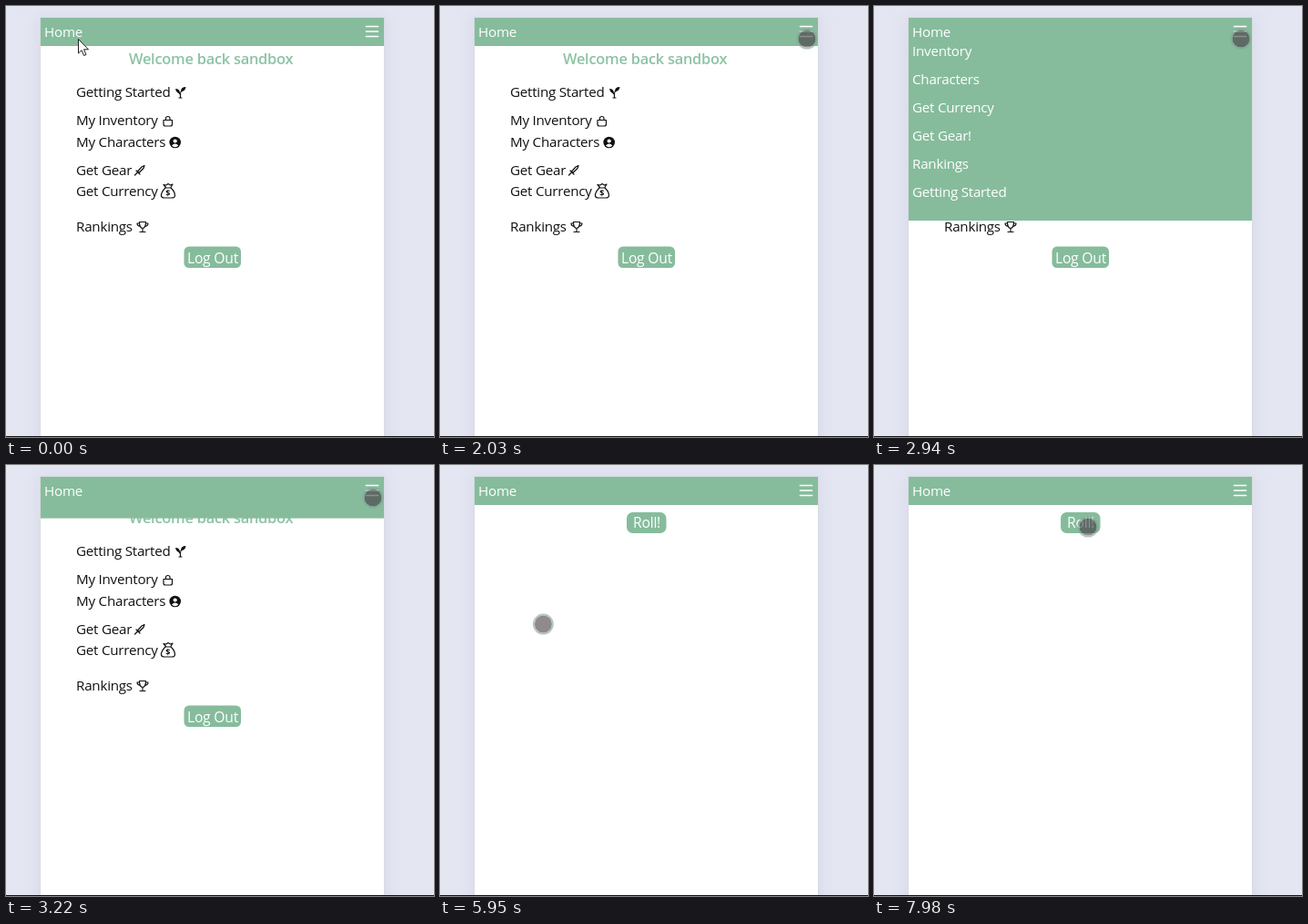
Recreate the animation shown at these times as an HTML page. Size 470 by 474 pixels, loop 8 s.

```html
<!DOCTYPE html>
<html lang="en">
<head>
<meta charset="utf-8">
<title>Game menu</title>
<style>
html, body { margin: 0; width: 100%; height: 100%; overflow: hidden; background: #e4e6f2; }
svg { display: block; width: 470px; height: 474px; font: 15.2px "Open Sans", "Noto Sans", sans-serif; letter-spacing: -.25px; }
.green { fill: #86bc9c; }
.white { fill: #fff; }
.ink { fill: #111; }
.welcome { font-size: 16.4px; font-weight: 600; fill: #8cc3a4; }
.button { font-size: 15.7px; }
.line { fill: none; stroke: #111; stroke-width: 1.2; stroke-linejoin: round; stroke-linecap: round; }
</style>
</head>
<body>
<svg viewBox="0 0 470 474">
  <defs>
    <filter id="blur" x="-20%" y="-20%" width="140%" height="140%"><feGaussianBlur stdDeviation="8"/></filter>
    <clipPath id="card"><rect x="38" y="13" width="377" height="461"/></clipPath>
  </defs>
  <rect width="470" height="474" fill="#e4e6f2"/>
  <rect x="34" y="11" width="385" height="500" fill="#d8daea" filter="url(#blur)"/>
  <rect x="37.5" y="12.5" width="378" height="470" fill="#fff" stroke="#d9dbe2"/>

  <g clip-path="url(#card)">
    <g id="home">
      <text class="welcome" x="135" y="64">Welcome back sandbox</text>
      <g class="ink">
        <text x="77" y="100">Getting Started</text>
        <text x="77" y="131">My Inventory</text>
        <text x="77" y="155">My Characters</text>
        <text x="77" y="186">Get Gear</text>
        <text x="77" y="209">Get Currency</text>
        <text x="77" y="248">Rankings</text>
      </g>
      <!-- seedling -->
      <path class="line" d="M191.500 101V97Q191.500 94 194 92M190 101H193M191 97L188 93"/>
      <path class="ink" d="M186 91Q191 91 191 96Q187 96 186 91ZM192 94Q192 89 197.500 89Q197 94 192 94Z"/>
      <!-- bag -->
      <path class="line" d="M173 125.500H182.500V130Q182.500 132 180.500 132H175Q173 132 173 130ZM175.500 125V123.500Q175.500 121.500 177.750 121.500T180 123.500V125"/>
      <!-- person -->
      <circle class="ink" cx="185.700" cy="150" r="6.300"/>
      <path class="white" d="M182 153.500Q185.700 149.500 189.400 153.500Q185.700 157 182 153.500Z"/>
      <circle class="white" cx="185.700" cy="148.500" r="2.100"/>
      <!-- sword -->
      <path class="line" d="M144.500 182L149 177L152 175.500L151 178.500L146 183.500ZM143 181L147 185M144.500 183L141.500 186"/>
      <!-- money bag -->
      <path class="line" d="M175 200Q170 205 170.500 209Q171 211 174 211H182Q185.500 211 185.500 208.500Q185.500 204 181 200ZM175.500 199.500L173 196.500L176 197L178 195.500L180.500 197L183 196L181 199.500"/>
      <text class="ink" x="175.300" y="209" font-size="9" font-weight="700">$</text>
      <!-- trophy -->
      <path class="line" d="M146.500 237.500H153.500Q153.500 244 150 244.500Q146.500 244 146.500 237.500ZM146.500 239H144Q144 242 147.500 242.500M153.500 239H156Q156 242 152.500 242.500M150 244.500V247.500M147 248.500H153"/>
      <rect class="green" x="195.500" y="264.500" width="62.500" height="23.500" rx="5.500"/>
      <text class="white button" x="199" y="282.500">Log Out</text>
    </g>

    <g id="roll">
      <rect class="green" x="205" y="52" width="43.500" height="23" rx="6.500"/>
      <text class="white button" x="212" y="69">Roll!</text>
    </g>

    <g id="menu" class="white">
      <rect class="green" x="38" y="44" width="377" height="223"/>
    </g>
    <rect class="green" x="38" y="13" width="377" height="31"/>
    <text class="white" x="42" y="34">Home</text>
    <path d="M395.500 22.500H408.500M395.500 28H408.500M395.500 33.500H408.500" stroke="#fff" stroke-width="1.700" stroke-linecap="round"/>
  </g>

  <rect y="473" width="470" height="1" fill="#111"/>

  <g id="pointer">
    <path id="arrow" d="M.5 .5V16L4 12.700L6.500 18.500L9 17.500L6.500 11.800H11.500Z" fill="#fff" stroke="#222" stroke-linejoin="round"/>
    <g id="touch">
      <circle r="9.500" fill="#3c303a" fill-opacity=".57"/>
      <circle r="10.500" fill="none" stroke="#84a098" stroke-opacity=".6" stroke-width="2"/>
    </g>
  </g>
</svg>
<script>
const LOOP = 8000, STEP = 70;
const CARD_RIGHT = 415, MENU_HEIGHT = 223, MENU_TIME = 500;
const MENU_OPENS = 2212, MENU_CLOSES = 2877, PAGE_CHANGES = 5460;

const home = { x: 79, y: 36 };
const moves = [
  { start: 770, end: 1350, x: 449, y: 45 },
  { start: 1350, end: 1900, x: 403, y: 36 },
  { start: 3500, end: 4300, x: 102, y: 181 },
  { start: 5850, end: 6405, x: 235, y: 68, bow: 12 }
];

const $ = id => document.getElementById(id);
const progress = (time, start, end) => Math.min(1, Math.max(0, (time - start) / (end - start)));
const smooth = u => u * u * (3 - 2 * u);
const mix = (a, b, u) => a + (b - a) * u;
const place = (id, x, y) => $(id).setAttribute('transform', `translate(${x} ${y})`);
const show = (id, visible) => { $(id).style.display = visible ? '' : 'none'; };

// The CSS "ease" curve, cubic-bezier(.25, .1, .25, 1), solved by bisection.
function ease(x) {
  const bezier = (p, q, s) => 3 * p * s * (1 - s) ** 2 + 3 * q * s * s * (1 - s) + s ** 3;
  let s = 0.5;
  for (let half = 0.25; half > 1e-5; half /= 2) s += bezier(.25, .25, s) < x ? half : -half;
  return x <= 0 ? 0 : x >= 1 ? 1 : bezier(.1, 1, s);
}

function pointerAt(time) {
  let { x, y } = home;
  for (const move of moves) {
    const u = smooth(progress(time, move.start, move.end));
    x = mix(x, move.x, u);
    y = mix(y, move.y, u) + (move.bow ?? 0) * 4 * u * (1 - u);
  }
  return { x, y };
}

['Inventory', 'Characters', 'Get Currency', 'Get Gear!', 'Rankings', 'Getting Started']
  .forEach((label, i) => {
    const text = document.createElementNS('http://www.w3.org/2000/svg', 'text');
    text.setAttribute('x', 42);
    text.setAttribute('y', 86 + 31 * i);
    text.textContent = label;
    $('menu').append(text);
  });

function draw(time) {
  const slide = start => ease(progress(time, start, start + MENU_TIME));
  place('menu', 0, MENU_HEIGHT * (slide(MENU_OPENS) - slide(MENU_CLOSES) - 1));

  show('home', time < PAGE_CHANGES);
  show('roll', time >= PAGE_CHANGES);

  const { x, y } = pointerAt(time);
  const touching = time > moves[0].start && x < CARD_RIGHT;
  place('pointer', x, y);
  show('touch', touching);
  show('arrow', !touching);
}

let start;
function render(now) {
  start ??= now;
  draw(Math.floor(((now - start) % LOOP) / STEP) * STEP);
  requestAnimationFrame(render);
}
draw(0);
requestAnimationFrame(render);
</script>
</body>
</html>
```
